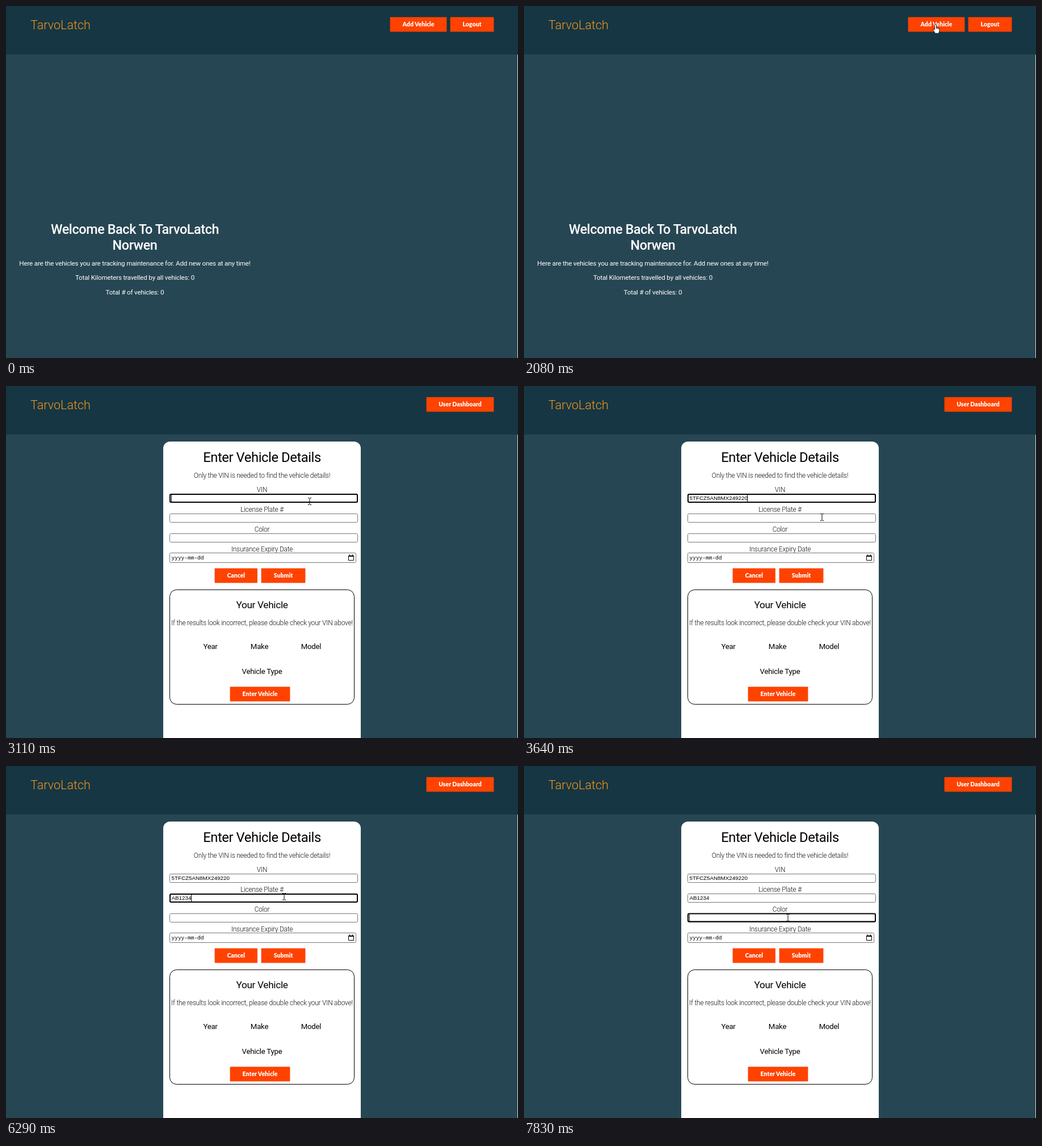
Write an HTML page that moves like this. It is 902 px wide and 621 px high and loops after 8 s.

```html
<!DOCTYPE html>
<html lang="en">
<head>
<meta charset="utf-8">
<title>Vehicle form</title>
<style>
  html, body { margin: 0; width: 100%; height: 100%; overflow: hidden; background: #274653; }
  svg { display: block; }
  text { font-family: Roboto, sans-serif; letter-spacing: -.0175em; text-anchor: middle; font-size: 11.7px; }
  .brand { font-size: 21.6px; font-weight: 300; fill: #f7941d; text-anchor: start; letter-spacing: 0; }
  .welcome { font-size: 23.4px; font-weight: 500; fill: #fff; }
  .body { fill: #fff; }
  .title { font-size: 23.75px; }
  .subtitle { font-size: 17.2px; }
  .head { font-size: 13.2px; }
  .label { font-size: 11.9px; font-weight: 300; fill: #111; }
  .note { font-size: 11.9px; font-weight: 300; fill: #111; }
  .button { font: 900 10.5px Lato, sans-serif; letter-spacing: 0; fill: #fff; }
  .value { font: 9.8px "Liberation Sans", Arial, sans-serif; letter-spacing: 0; text-anchor: start; }
  .date { font: 9.5px "Noto Sans Mono", monospace; letter-spacing: 0; text-anchor: start; }
  .field { fill: #fff; stroke: #767676; }
</style>
</head>
<body>
<svg id="stage" width="902" height="621" viewBox="0 0 902 621">
  <rect width="902" height="621" fill="#274653"/>
  <rect width="902" height="85.5" fill="#153642"/>
  <rect x="901.2" y="86" width=".8" height="535" fill="#fff"/>
  <g id="home"></g>
  <g id="form">
    <path d="M277 621V110a12 12 0 0 1 12-12H613a12 12 0 0 1 12 12V621Z" fill="#fff"/>
    <rect x="288.5" y="359.5" width="325" height="202" rx="12" fill="none" stroke="#000"/>
  </g>
  <rect id="ring" x="289" width="330" height="14" rx="2" fill="none" stroke="#000" stroke-width="2"/>
  <rect id="caret" width="1" height="12"/>
  <g id="pointer">
    <path id="arrow" d="M.5 .5V14.5L3.7 11.6 5.8 16.4 7.8 15.5 5.7 10.9H10.3Z" fill="#fff" stroke="#000" stroke-width=".8"/>
    <path id="hand" d="M-1.6 1Q0-.8 1.3 1V5.5L5.4 6.6Q7 7.2 6.9 9V12L5.6 16.2H-.6L-4.2 10.6Q-4.4 8.2-1.6 9.8Z M1.3 5.5V8.5M3.3 6.2V8.7M5.2 6.7V9" fill="#fff" stroke="#000" stroke-width=".8"/>
    <path id="beam" d="M-3-5.5H-1L0-4.5 1-5.5H3M0-4.5V5.5M-3 6.5H-1L0 5.5 1 6.5H3" fill="none" stroke="#000"/>
  </g>
</svg>
<script>
const NS = "http://www.w3.org/2000/svg";
const LOOP = 8000, BLINK = 530;
const $ = id => document.getElementById(id);
const home = $("home"), form = $("form");

function add(parent, tag, attrs, content = "") {
  const node = document.createElementNS(NS, tag);
  for (const key in attrs) node.setAttribute(key, attrs[key]);
  node.textContent = content;
  return parent.appendChild(node);
}
const write = (parent, cls, x, y, content) => add(parent, "text", { class: cls, x, y }, content);
function button(parent, x, y, width, label) {
  add(parent, "rect", { x: x - .4, y: y - .4, width: width + .8, height: 25.8, fill: "#ff4200" });
  write(parent, "button", x + width / 2, y + 16.3, label);
}
const field = (y, width = 331, height = 15) =>
  add(form, "rect", { class: "field", x: 288.5, y, width, height, rx: 2 });

const brand = "TarvoLatch";
write($("stage"), "brand", 43, 41, brand);
$("stage").append($("ring"), $("caret"), $("pointer"));

button(home, 677, 20, 99, "Add Vehicle");
button(home, 783, 20, 76, "Logout");
write(home, "welcome", 227, 402, "Welcome Back To " + brand);
write(home, "welcome", 227, 430, "Norwen");
write(home, "body", 227, 457.5, "Here are the vehicles you are tracking maintenance for. Add new ones at any time!");
write(home, "body", 227, 483, "Total Kilometers travelled by all vehicles: 0");
write(home, "body", 227, 509, "Total # of vehicles: 0");

button(form, 741, 20, 118, "User Dashboard");
write(form, "title", 451, 134, "Enter Vehicle Details");
write(form, "label", 451, 161.5, "Only the VIN is needed to find the vehicle details!");
["VIN", "License Plate #", "Color", "Insurance Expiry Date"].forEach((name, i) =>
  write(form, "label", 451, 187 + 35 * i, name));
[190.5, 225.5, 260.5].forEach(y => field(y));
field(294.5, 328, 17);
write(form, "date", 291.5, 306, "yyyy-mm-dd");
add(form, "path", { d: "M603.5 299.5H612.5V307.5H603.5ZM603 300.5H613M605.5 297V299M610.5 297V299", fill: "none", stroke: "#000" });
button(form, 368, 322, 74.5, "Cancel");
button(form, 450, 322, 77, "Submit");
write(form, "subtitle", 451, 392, "Your Vehicle");
write(form, "note", 451, 422, "If the results look incorrect, please double check your VIN above!");
write(form, "head", 360, 464, "Year");
write(form, "head", 446.5, 464, "Make");
write(form, "head", 537.5, 464, "Model");
write(form, "head", 451, 508, "Vehicle Type");
button(form, 395, 531, 105, "Enter Vehicle");
const values = [201, 236, 271].map(y => write(form, "value", 291.5, y, ""));

// Pointer moves: start, end, number of steps, target x, target y, easing
const smooth = p => p * p * (3 - 2 * p);
const slow = p => 1 - (1 - p) ** 2;
const line = p => p;
const moves = [
  [450, 730, 5, 828, 152, slow],
  [930, 1460, 9, 730, 32, smooth],
  [1740, 2080, 6, 725, 32, line],
  [2290, 2970, 10, 536, 204, smooth],
  [3110, 3110, 1, 535, 203, line],
  [3175, 3370, 4, 539, 231, smooth],
  [3510, 3900, 6, 486, 229.5, smooth],
  [6290, 6290, 1, 490, 230, line],
  [6360, 6630, 5, 466, 269, smooth],
  [6770, 6830, 2, 465, 267, line]
];

// Input events: time, field, text in it
const edits = [
  [2970, 0, ""], [3240, 0, "5TFCZ5AN8MX249220"],
  [3900, 1, ""], [4760, 1, "A"], [5020, 1, "AB"], [5620, 1, "AB1"],
  [5690, 1, "AB12"], [5960, 1, "AB123"], [6090, 1, "AB1234"],
  [6770, 2, ""]
];

function pointerAt(t) {
  let x = 881, y = 847;
  for (const [start, end, steps, toX, toY, ease] of moves) {
    if (t < start) break;
    const gap = steps > 1 ? (end - start) / (steps - 1) : 1;
    const step = Math.min(steps, Math.floor((t - start) / gap + 1e-6) + 1);
    const p = ease(step / steps);
    x += (toX - x) * p;
    y += (toY - y) * p;
  }
  return [x, y];
}

const show = (node, on) => node.setAttribute("visibility", on ? "visible" : "hidden");

function draw(t) {
  const onForm = t >= 2150;
  show(home, !onForm);
  show(form, onForm);

  const [x, y] = pointerAt(t);
  const kind = t < 450 ? "" : t < 2290 && y < 45 && x < 776 ? "hand" : onForm && y > 189 ? "beam" : "arrow";
  for (const id of ["arrow", "hand", "beam"]) show($(id), id === kind);
  $("pointer").setAttribute("transform", `translate(${Math.round(x)} ${Math.round(y)})`);

  const text = ["", "", ""];
  let last = null;
  for (const edit of edits) {
    if (t < edit[0]) break;
    last = edit;
    text[edit[1]] = edit[2];
  }
  values.forEach((node, i) => { if (node.textContent !== text[i]) node.textContent = text[i]; });
  show($("ring"), last);
  show($("caret"), last && Math.floor((t - last[0]) / BLINK) % 2 === 0);
  if (last) {
    const top = 191 + 35 * last[1];
    $("ring").setAttribute("y", last[1] === 2 ? top - .5 : top);
    $("caret").setAttribute("y", top + 1);
    const width = last[2] ? values[last[1]].getComputedTextLength() : 0;
    $("caret").setAttribute("x", Math.round(291 + width));
  }
}

const begin = performance.now();
function tick() {
  draw((performance.now() - begin) % LOOP);
  requestAnimationFrame(tick);
}
draw(0);
requestAnimationFrame(tick);
</script>
</body>
</html>
```
